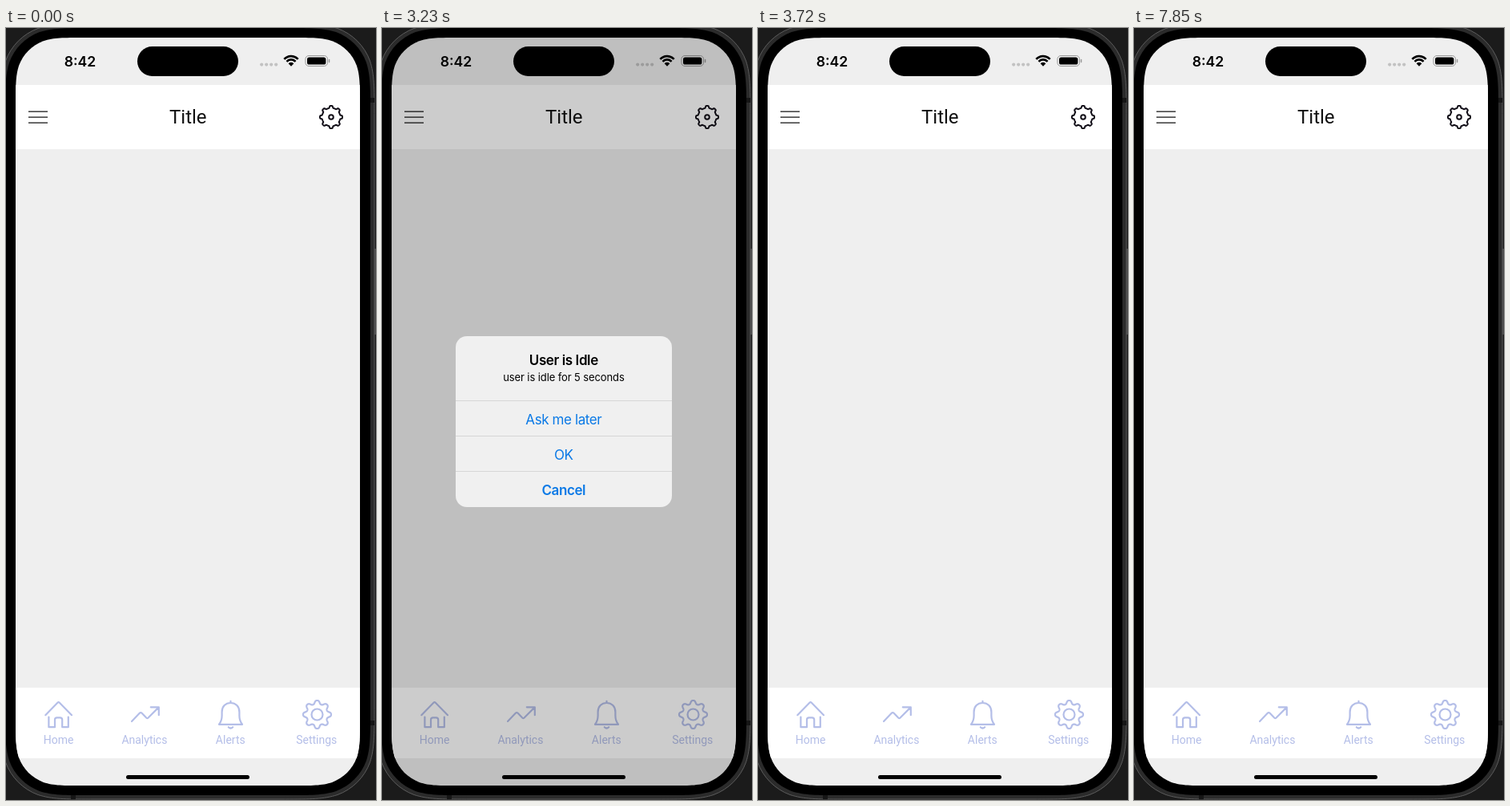
An HTML page with a canvas that plays this animation: 462 px wide and 962 px high, repeating every 7.99 s.

```html
<!DOCTYPE html>
<html lang="en">
<head>
<meta charset="utf-8">
<title>Idle alert</title>
<style>
html, body { margin: 0; width: 100%; height: 100%; overflow: hidden; background: #1b1b1b; }
canvas { display: block; }
</style>
</head>
<body>
<canvas id="stage" width="462" height="962"></canvas>
<script>
const ctx = document.getElementById('stage').getContext('2d');
const LOOP = 7990, SHOW = 500, HIDE = 3230, STEP = 70;
const TINT = '#b4bee8', BLUE = '#0a79e6';
const SANS = 'Inter, sans-serif', ROBOTO = 'Roboto, sans-serif';

// Rectangle with continuous-curvature corners.
function squircle(x, y, w, h, r) {
  const path = new Path2D();
  const corners = [[x, y, 1, 1, 0], [x + w, y, -1, 1, 1], [x + w, y + h, -1, -1, 0], [x, y + h, 1, -1, 1]];
  const curve = [[0, 1.529], [0, 1.088], [0, .868], [.075, .631], [.169, .373], [.373, .169], [.631, .075], [.868, 0], [1.088, 0], [1.529, 0]];
  corners.forEach(([cx, cy, sx, sy, flip]) => {
    const p = curve.map(([a, b]) => [cx + sx * a * r, cy + sy * b * r]);
    if (flip) p.reverse();
    path.lineTo(...p[0]);
    for (let i = 1; i < 10; i += 3) path.bezierCurveTo(...p[i], ...p[i + 1], ...p[i + 2]);
  });
  path.closePath();
  return path;
}

const screen = squircle(12, 12, 430, 932, 55);
const rimOuter = squircle(-6, -5, 466, 966, 73);
const rimInner = squircle(-1, 0, 456, 956, 68);

function fill(color, path) {
  ctx.fillStyle = color;
  ctx.fill(path);
}

function rect(color, x, y, w, h, r = 0) {
  ctx.fillStyle = color;
  ctx.beginPath();
  ctx.roundRect(x, y, w, h, r);
  ctx.fill();
}

function stroke(color, width, path) {
  ctx.strokeStyle = color;
  ctx.lineWidth = width;
  ctx.lineCap = ctx.lineJoin = 'round';
  ctx.stroke(typeof path === 'string' ? new Path2D(path) : path);
}

function text(str, x, y, font, color, spacing = 0) {
  ctx.font = font;
  ctx.fillStyle = color;
  ctx.textAlign = 'center';
  ctx.letterSpacing = spacing + 'px';
  ctx.fillText(str, x + spacing / 2, y);
}

function disc(x, y, r) {
  const path = new Path2D();
  path.arc(x, y, r, 0, 7);
  return path;
}

// Eight-toothed outline; a positive bias narrows the teeth.
function gear(cx, cy, inner, outer, sharpness, bias) {
  const path = new Path2D();
  const wave = c => Math.tanh(sharpness * (c - bias));
  const low = wave(-1), high = wave(1);
  for (let i = 0; i < 240; i++) {
    const a = i * Math.PI / 120;
    const r = inner + (outer - inner) * (wave(Math.cos(8 * a)) - low) / (high - low);
    path.lineTo(cx + r * Math.cos(a), cy + r * Math.sin(a));
  }
  path.closePath();
  return path;
}

const headerGear = gear(406, 111, 11.4, 14, 3, .25);
const tabGear = gear(388.5, 855.5, 13.3, 17.5, 1.2, 0);

function drawPhone() {
  ctx.fillStyle = '#1b1b1b';
  ctx.fillRect(0, 0, 462, 962);
  rect('#4a4a4a', 459, 275, 4, 107, 1);
  fill('#2b2b2b', rimOuter);
  stroke('#5c5c5c', 1, rimOuter);
  rect('#161616', 454, 87, 6, 6);
  rect('#161616', 454, 863, 6, 6);
  rect('#161616', 81, 955, 6, 6);
  fill('#000', rimInner);
}

function drawStatus() {
  text('8:42', 92.5, 47.5, `600 17.6px ${SANS}`, '#000');
  for (let i = 0; i < 4; i++) fill('#c2c2c2', disc(319.2 + i * 6, 45.6, 2.1));

  ctx.lineCap = 'butt';
  ctx.strokeStyle = '#000';
  [11.9, 7.6].forEach(r => {
    ctx.lineWidth = 2.6;
    ctx.beginPath();
    ctx.arc(356, 47, r, -Math.PI * .76, -Math.PI * .24);
    ctx.stroke();
  });
  fill('#000', new Path2D('M356 47.8 L352.6 44.2 Q356 41.4 359.4 44.2 Z'));

  ctx.strokeStyle = '#9a9a9a';
  ctx.lineWidth = 1;
  ctx.beginPath();
  ctx.roundRect(373.9, 34.5, 27.6, 13, 4.2);
  ctx.stroke();
  rect('#000', 376, 36.5, 23.4, 9, 2.6);
  rect('#9a9a9a', 402.8, 38.8, 1.5, 4.4, .8);
}

function drawHeader() {
  rect('#fff', 12, 71, 430, 80);
  [104, 111, 118].forEach(y => rect('#111', 28, y - .6, 24, 1.3));
  text('Title', 227.3, 119, `24px ${ROBOTO}`, '#111');
  stroke('#120f18', 2, headerGear);
  stroke('#120f18', 2, disc(406, 111, 2.8));
}

function drawTabs() {
  rect('#fff', 12, 822, 430, 88);
  const icons = [
    'M49.3 856.2 L64.4 840.8 Q65.6 839.6 66.8 840.8 L82 856.2',
    'M53.4 858.5 V871.2 H61 V862 Q61 859.4 63.6 859.4 H67.6 Q70.2 859.4 70.2 862 V871.2 H77.8 V858.5',
    'M157 864 L167 853.6 Q168.2 852.5 169.4 853.5 L175.2 859.5 Q176.4 860.6 177.6 859.5 L190.5 846.6 M180.8 846.3 H190.8 V856.2',
    'M280.5 838.8 V840.8 M266 867.8 H295 M266 867.8 Q269.6 863.2 269.6 857 V852.4 C269.6 845.4 274.2 841 280.5 841 S291.4 845.4 291.4 852.4 V857 Q291.4 863.2 295 867.8',
    'M277.8 871.2 Q280.5 873.8 283.2 871.2'
  ];
  icons.forEach(d => stroke(TINT, 2.2, d));
  stroke(TINT, 2.2, tabGear);
  stroke(TINT, 2.2, disc(388.5, 855.5, 7));
  ['Home', 'Analytics', 'Alerts', 'Settings'].forEach((label, i) =>
    text(label, 65.5 + i * 107.4, 892, `14px ${ROBOTO}`, TINT));
}

function drawAlert(opacity) {
  ctx.globalAlpha = opacity;
  rect('#f0f0f0', 92, 384, 270, 213, 14);
  [464, 508, 552].forEach(y => rect('#d6d6d6', 92, y, 270, 1));
  text('User is Idle', 227, 420, `600 17px ${SANS}`, '#000', -.4);
  text('user is idle for 5 seconds', 227, 440.3, `13px ${SANS}`, '#000', -.1);
  text('Ask me later', 227, 493.6, `17px ${SANS}`, BLUE, -.4);
  text('OK', 227, 538, `17px ${SANS}`, BLUE, -.4);
  text('Cancel', 227, 582, `600 17px ${SANS}`, BLUE, -.4);
  ctx.globalAlpha = 1;
}

// Alert presence: instant in, critically damped spring out.
function presence(t) {
  if (t < SHOW) return 0;
  if (t < HIDE) return 1;
  const step = Math.floor((t - HIDE) / STEP);
  return step < 4 ? (1 + 1.5 * step) * Math.exp(-1.5 * step) : 0;
}

function draw(t) {
  const shown = presence(t);
  drawPhone();
  ctx.save();
  ctx.clip(screen);
  rect('#efefef', 12, 12, 430, 932);
  drawHeader();
  drawTabs();
  drawStatus();
  if (shown) {
    rect(`rgba(0, 0, 0, ${.2 * shown})`, 12, 12, 430, 932);
    drawAlert(shown);
  }
  rect('#000', 164, 23, 126, 37, 18.5);
  rect('#000', 150, 931, 154, 5, 2.5);
  ctx.restore();
}

const start = performance.now();
function tick() {
  draw((performance.now() - start) % LOOP);
  requestAnimationFrame(tick);
}
tick();
</script>
</body>
</html>
```
